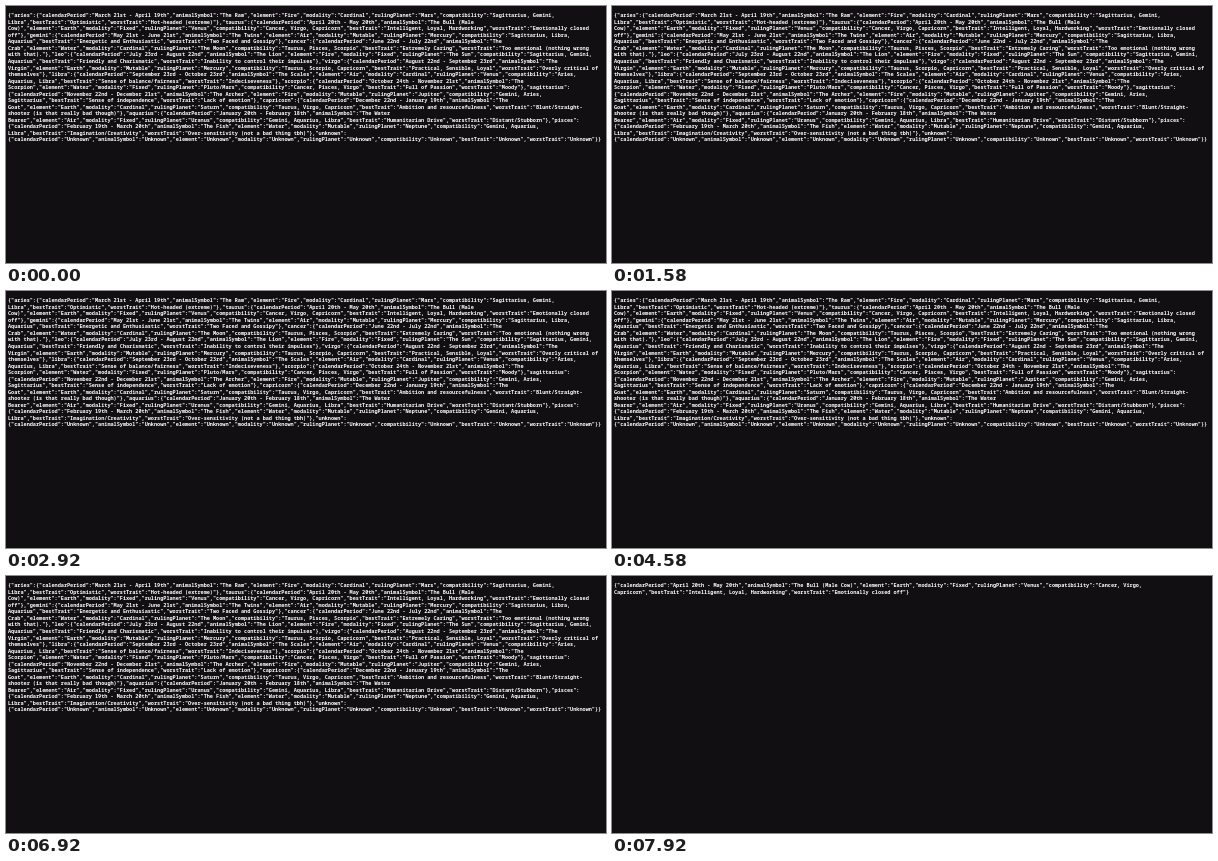
Animation of 600x257 px, one loop 8 s. Source, as an HTML page:

```html
<!DOCTYPE html>
<html lang="en">
<head>
<meta charset="utf-8">
<title>Zodiac API</title>
<style>
  html, body { margin: 0; width: 100%; height: 100%; overflow: hidden; background: #110f11; }
  /* Laid out large and scaled down so the small type keeps its fractional advance. */
  pre {
    position: absolute; left: 1.5px; top: 5.8px; margin: 0;
    font: 700 51.67px/65.2px "Noto Sans Mono", "DejaVu Sans Mono", monospace;
    font-variant-ligatures: none;
    color: #fff; transform: scale(.1002); transform-origin: 0 0;
  }
</style>
</head>
<body>
<pre id="out"></pre>
<script>
const COLUMNS = 190, LOOP = 8000, SWITCH = 7000;

const KEYS = ["calendarPeriod", "animalSymbol", "element", "modality",
  "rulingPlanet", "compatibility", "bestTrait", "worstTrait"];

const ROWS = `
aries|March 21st - April 19th|The Ram|Fire|Cardinal|Mars|Sagittarius, Gemini, Libra|Optimistic|Hot-headed (extreme)
taurus|April 20th - May 20th|The Bull (Male Cow)|Earth|Fixed|Venus|Cancer, Virgo, Capricorn|Intelligent, Loyal, Hardworking|Emotionally closed off
gemini|May 21st - June 21st|The Twins|Air|Mutable|Mercury|Sagittarius, Libra, Aquarius|Energetic and Enthusiastic|Two Faced and Gossipy
cancer|June 22nd - July 22nd|The Crab|Water|Cardinal|The Moon|Taurus, Pisces, Scorpio|Extremely Caring|Too emotional (nothing wrong with that).
leo|July 23rd - August 22nd|The Lion|Fire|Fixed|The Sun|Sagittarius, Gemini, Aquarius|Friendly and Charismatic|Inability to control their impulses
virgo|August 22nd - September 23rd|The Virgin|Earth|Mutable|Mercury|Taurus, Scorpio, Capricorn|Practical, Sensible, Loyal|Overly critical of themselves
libra|September 23rd - October 23rd|The Scales|Air|Cardinal|Venus|Aries, Aquarius, Libra|Sense of balance/fairness|Indeciseveness
scorpio|October 24th - November 21st|The Scorpion|Water|Fixed|Pluto/Mars|Cancer, Pisces, Virgo|Full of Passion|Moody
sagittarius|November 22nd - December 21st|The Archer|Fire|Mutable|Jupiter|Gemini, Aries, Sagittarius|Sense of independence|Lack of emotion
capricorn|December 22nd - January 19th|The Goat|Earth|Cardinal|Saturn|Taurus, Virgo, Capricorn|Ambition and resourcefulness|Blunt/Straight-shooter (is that really bad though)
aquarius|January 20th - February 18th|The Water Bearer|Air|Fixed|Uranus|Gemini, Aquarius, Libra|Humanitarian Drive|Distant/Stubborn
pisces|February 19th - March 20th|The Fish|Water|Mutable|Neptune|Gemini, Aquarius, Libra|Imagination/Creativity|Over-sensitivity (not a bad thing tbh)
unknown${"|Unknown".repeat(KEYS.length)}`;

const signs = Object.fromEntries(ROWS.trim().split("\n").map(row => {
  const [name, ...values] = row.split("|");
  return [name, Object.fromEntries(KEYS.map((key, i) => [key, values[i]]))];
}));

// Breaks after spaces and hyphens, and before a nested object.
function wrap(data) {
  const lines = [""];
  for (const part of JSON.stringify(data).split(/(?<=[ -])|(?=\{"c)/)) {
    const last = lines.length - 1;
    if ((lines[last] + part).trimEnd().length > COLUMNS) lines.push(part);
    else lines[last] += part;
  }
  return lines.join("\n");
}

const out = document.getElementById("out");
const all = wrap(signs), single = wrap(signs.taurus);
const start = performance.now();
let shown;

function draw() {
  const t = (performance.now() - start) % LOOP;
  const text = t < SWITCH ? all : single;
  if (text !== shown) out.textContent = shown = text;
  requestAnimationFrame(draw);
}
draw();
</script>
</body>
</html>
```
